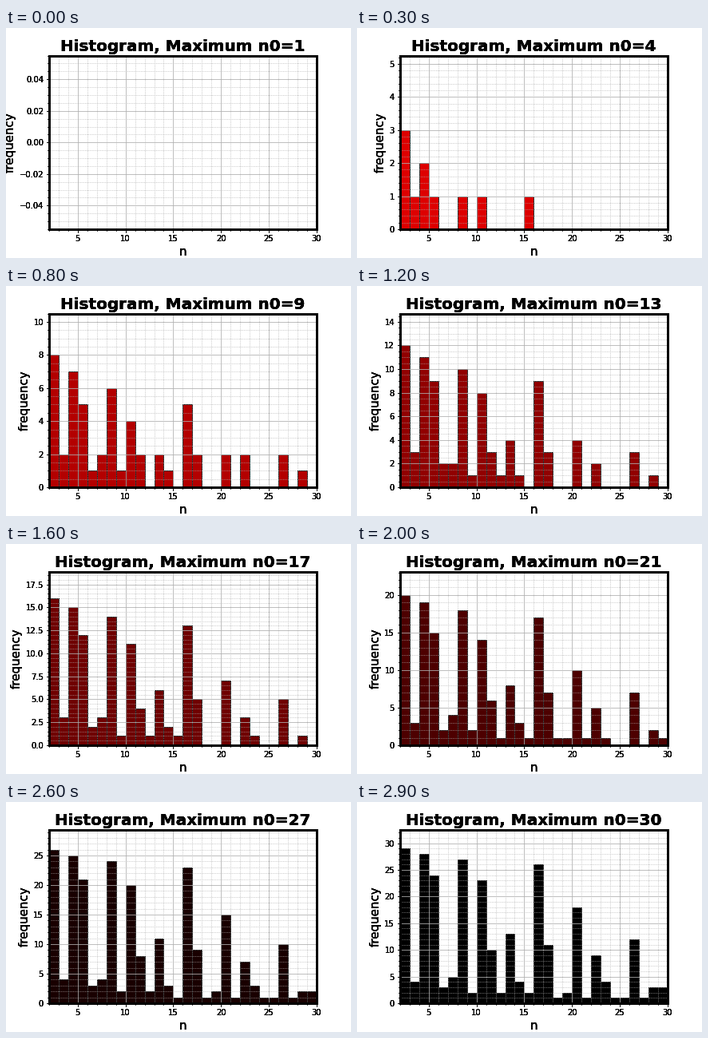
Recreate the animation shown at these times as a matplotlib script. Size 432 by 288 pixels, loop 3000 ms.

```python
import matplotlib.pyplot as plt
import numpy as np
from matplotlib.animation import FuncAnimation

LAST = 30
LAYERS = 4  # stacked labels give the heavy, hard-edged lettering

plt.rcParams.update({"font.family": "DejaVu Sans", "font.size": 10})


def collatz(n):
    """Hailstone sequence from n down to 1."""
    seq = [n]
    while n > 1:
        n = 3 * n + 1 if n % 2 else n // 2
        seq.append(n)
    return seq


def histogram(n0):
    """Unit-bin counts of all values visited from starts 1..n0."""
    values = [1]
    for start in range(1, n0 + 1):
        values += collatz(start)
    top = max(values)
    if top < 2:
        return np.array([])
    return np.histogram(values, bins=np.arange(1, top + 1))[0]


def make_axes(first):
    ax = fig.add_axes([0.125, 0.125, 0.775, 0.755])
    ax.set_xlim(2, LAST)
    ax.set_xlabel("n", fontsize=15)
    ax.set_ylabel("frequency", fontsize=15)
    ax.minorticks_on()
    if first:
        ax.grid(which="major", linestyle="-")
        ax.grid(which="minor", linestyle=":")
        for spine in ax.spines.values():
            spine.set_linewidth(3)
    else:
        ax.patch.set_visible(False)
        for spine in ax.spines.values():
            spine.set_visible(False)
    return ax


fig = plt.figure(figsize=(6, 4), dpi=72, facecolor="white")
layers = [make_axes(i == 0) for i in range(LAYERS)]
base = layers[0]


def draw(frame):
    n0 = frame + 1
    counts = histogram(n0)
    for bar in list(base.patches):
        bar.remove()
    shown = counts[1:LAST - 1]
    if len(shown):
        base.bar(np.arange(2, 2 + len(shown)), shown, width=1, align="edge",
                 color=(1 - n0 / LAST, 0, 0), edgecolor="black", linewidth=1)
    limits = (0, 1.05 * counts.max()) if len(counts) else (-0.055, 0.055)
    for ax in layers:
        ax.set_xlim(2, LAST)
        ax.set_ylim(*limits)
        ax.set_title(f"Histogram, Maximum n0={n0}", fontsize=20,
                     fontweight="bold")
    return []


anim = FuncAnimation(fig, draw, frames=LAST, interval=100, repeat=True,
                     repeat_delay=0, init_func=lambda: [], blit=False)
plt.show()
```
